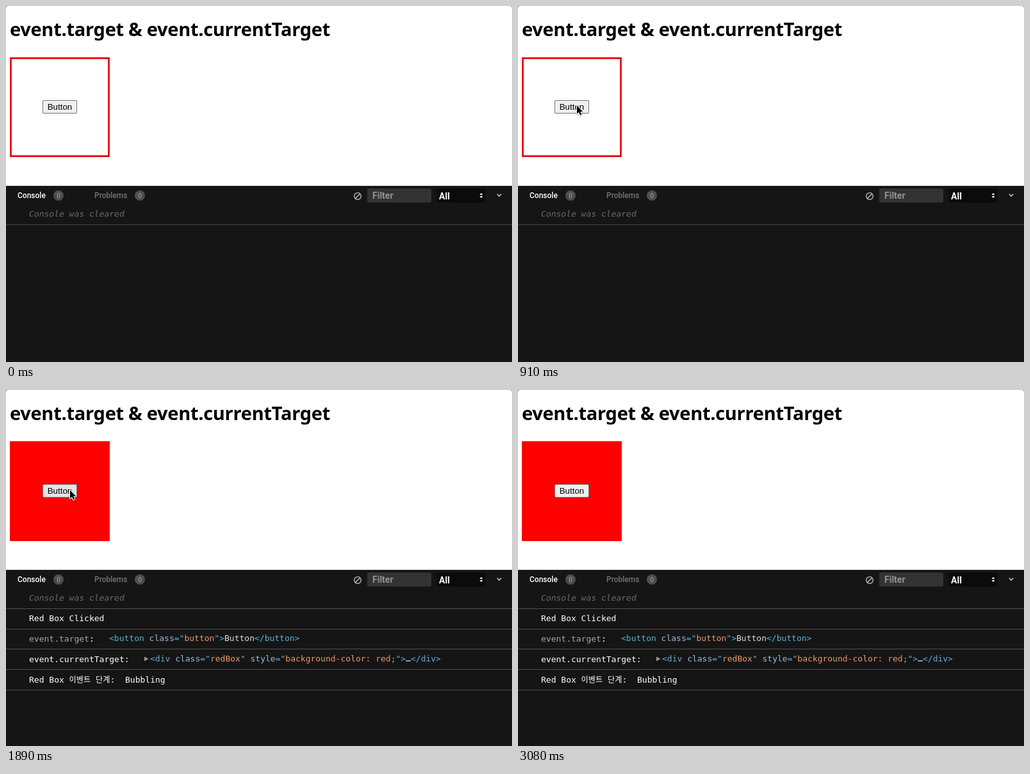
Write an HTML page with a canvas that moves like this. It is 790x556 px and loops after 3150 ms.

```html
<!DOCTYPE html>
<html lang="ko">
<head>
<meta charset="utf-8">
<title>event.target &amp; event.currentTarget</title>
<style>
  html, body { margin: 0; width: 100%; height: 100%; overflow: hidden; background: #fff; }
  canvas { display: block; }
</style>
</head>
<body>
<canvas id="stage" width="790" height="556"></canvas>
<script>
const ctx = document.getElementById('stage').getContext('2d');
const LOOP = 3150, STEP = 70;
const MONO = '13px "DejaVu Sans Mono", monospace';
const UI = 'Roboto, sans-serif';
const HANGUL = '12.2px "Noto Sans CJK KR", "Noto Sans CJK", sans-serif';
const BLUE = '#5db0d7', ATTR = '#9bbbdc', VALUE = '#f29766', WHITE = '#fff';

const CLICK = 1330, LOGGED = 1400, LEAVE = 2240;
const EXIT = [[99, 155], [130, 192], [225, 310], [325, 417], [420, 498], [510, 544], [587, 562]];

function rect(x, y, w, h, fill, radius = 0) {
  ctx.fillStyle = fill;
  ctx.beginPath();
  ctx.roundRect(x, y, w, h, radius);
  ctx.fill();
}

function text(str, x, y, font, fill) {
  ctx.font = font;
  ctx.fillStyle = fill;
  ctx.fillText(str, x, y);
  return x + ctx.measureText(str).width;
}

function spans(parts, x, y) {
  for (const [str, color] of parts) x = text(str, x, y, MONO, color);
}

function shape(points, fill) {
  ctx.beginPath();
  points.forEach(([x, y]) => ctx.lineTo(x, y));
  ctx.closePath();
  ctx.fillStyle = fill;
  ctx.fill();
}

function line(points, color, width) {
  ctx.beginPath();
  points.forEach(([x, y]) => ctx.lineTo(x, y));
  ctx.strokeStyle = color;
  ctx.lineWidth = width;
  ctx.stroke();
}

function circle(x, y, r) {
  ctx.beginPath();
  ctx.arc(x, y, r, 0, Math.PI * 2);
}

function drawPage(t) {
  rect(0, 0, 790, 281, WHITE);
  ctx.letterSpacing = '-0.28px';
  text('event.target & event.currentTarget', 6, 47, 'bold 29px "Noto Sans", sans-serif', '#000');
  ctx.letterSpacing = '0px';

  if (t >= LOGGED) {
    rect(6, 80, 156, 156, '#f00');
  } else {
    ctx.strokeStyle = '#eb0000';
    ctx.lineWidth = 2.7;
    ctx.strokeRect(7.5, 81.5, 153, 153);
  }

  const pressed = t >= CLICK && t < LOGGED;
  const hovered = t >= LOGGED && t < LEAVE;
  rect(57, 147, 54, 21, pressed ? '#8d8d8d' : '#767676', 2.5);
  rect(58, 148, 52, 19, pressed ? '#f5f5f5' : hovered ? '#e5e5e5' : '#efefef', 1.5);
  text('Button', 64.7, 162, '13.333px "Liberation Sans", Arial, sans-serif', '#000');
}

function drawBadge(x) {
  circle(x, 296, 8);
  ctx.fillStyle = '#4d4d4d';
  ctx.fill();
  ctx.textAlign = 'center';
  text('0', x, 299.5, `10px ${UI}`, '#a0a0a0');
  ctx.textAlign = 'left';
}

function drawToolbar() {
  rect(0, 281, 790, 275, '#151515');
  rect(0, 280, 790, 1, '#e2e2e2');
  text('Console', 18, 300, `500 12px ${UI}`, WHITE);
  text('Problems', 138, 300, `500 12px ${UI}`, '#757575');
  drawBadge(82);
  drawBadge(209);

  circle(549, 297, 5.3);
  ctx.strokeStyle = '#c4c4c4';
  ctx.lineWidth = 1.3;
  ctx.stroke();
  line([[545.3, 300.7], [552.7, 293.3]], '#c4c4c4', 1.3);

  rect(564, 285, 100, 22, '#333', 3);
  text('Filter', 572, 301, `bold 14px ${UI}`, '#939393');
  rect(672, 285, 76, 22, '#0b0b0b', 3);
  text('All', 676, 302, `bold 14px ${UI}`, WHITE);
  shape([[739.5, 295], [742, 292], [744.5, 295]], WHITE);
  shape([[739.5, 297], [742, 300], [744.5, 297]], WHITE);
  line([[766.8, 293.8], [770, 297], [773.2, 293.8]], '#ddd', 1.3);
}

function drawConsole(t) {
  drawToolbar();
  text('Console was cleared', 36, 329, `italic ${MONO}`, '#6b6b6b');
  rect(0, 341, 790, 1, t < LOGGED ? '#444' : '#505050');
  if (t < LOGGED) return;

  for (const y of [373, 404, 436, 468]) rect(0, y, 790, 1, '#505050');
  text('Red Box Clicked', 36, 361, MONO, WHITE);

  if (t >= 2380 && t < 2450) rect(161, 380, 297, 16, '#272727');
  spans([['event.target', '#a5a5a5'], [':', WHITE]], 36, 393);
  spans([
    ['<button ', BLUE], ['class', ATTR], ['="', BLUE], ['button', VALUE], ['">', BLUE],
    ['Button', '#ddd'], ['</button>', BLUE]
  ], 161, 392);

  text('event.currentTarget:', 36, 425, MONO, WHITE);
  shape([[216, 416.5], [222.5, 420], [216, 423.5]], '#9a9a9a');
  spans([
    ['<div ', BLUE], ['class', ATTR], ['="', BLUE], ['redBox', VALUE], ['" ', BLUE],
    ['style', ATTR], ['="', BLUE], ['background-color: red;', VALUE], ['">', BLUE],
    ['…', WHITE], ['</div>', BLUE]
  ], 225, 424);

  text('Red Box', 36, 457, MONO, WHITE);
  text('이벤트', 98.6, 457, HANGUL, WHITE);
  text('단계', 140, 457, HANGUL, WHITE);
  text(':', 162.6, 457, MONO, WHITE);
  text('Bubbling', 186, 457, MONO, WHITE);
}

// Cursor tip position, or null while it is off the stage.
function cursorAt(t) {
  if (t < 70) return null;
  if (t <= 560) {
    const left = 1 - (t - 70) / 490;
    return [98 + 250 * left ** 1.75, 171 + 376 * left ** 1.53];
  }
  if (t < 700) return [94, 161];
  if (t <= 910) return [91, 154];
  if (t < 1050) return [95, 155];
  if (t < LEAVE) return [99, 155];
  return EXIT[Math.floor((t - LEAVE) / STEP) + 1] || null;
}

function drawCursor([x, y]) {
  ctx.save();
  ctx.translate(x + 1, y + 1.5);
  ctx.beginPath();
  [[0, 0], [0, 13], [3, 10.3], [5.1, 15], [7.3, 14.1], [5.3, 9.5], [9.3, 9.5]]
    .forEach(([px, py]) => ctx.lineTo(px, py));
  ctx.closePath();
  ctx.shadowColor = 'rgba(0,0,0,.3)';
  ctx.shadowBlur = 3;
  ctx.shadowOffsetY = 1;
  ctx.lineJoin = 'round';
  ctx.lineWidth = 2;
  ctx.strokeStyle = WHITE;
  ctx.stroke();
  ctx.shadowColor = 'transparent';
  ctx.fillStyle = '#000';
  ctx.fill();
  ctx.restore();
}

function drawClickRing() {
  circle(99, 157, 20);
  for (const [color, width] of [['rgba(255,255,255,.8)', 5.5], ['#000', 3]]) {
    ctx.strokeStyle = color;
    ctx.lineWidth = width;
    ctx.stroke();
  }
}

function frame(now) {
  const t = Math.floor((now % LOOP) / STEP) * STEP;
  drawPage(t);
  drawConsole(t);
  shape([[0, 0], [2, 0], [0, 2]], '#777');
  shape([[790, 0], [788, 0], [790, 2]], '#777');
  if (t >= CLICK && t < LOGGED) drawClickRing();
  const tip = cursorAt(t);
  if (tip) drawCursor(tip);
}

const start = performance.now();
function tick() {
  frame(performance.now() - start);
  requestAnimationFrame(tick);
}
tick();
</script>
</body>
</html>
```
